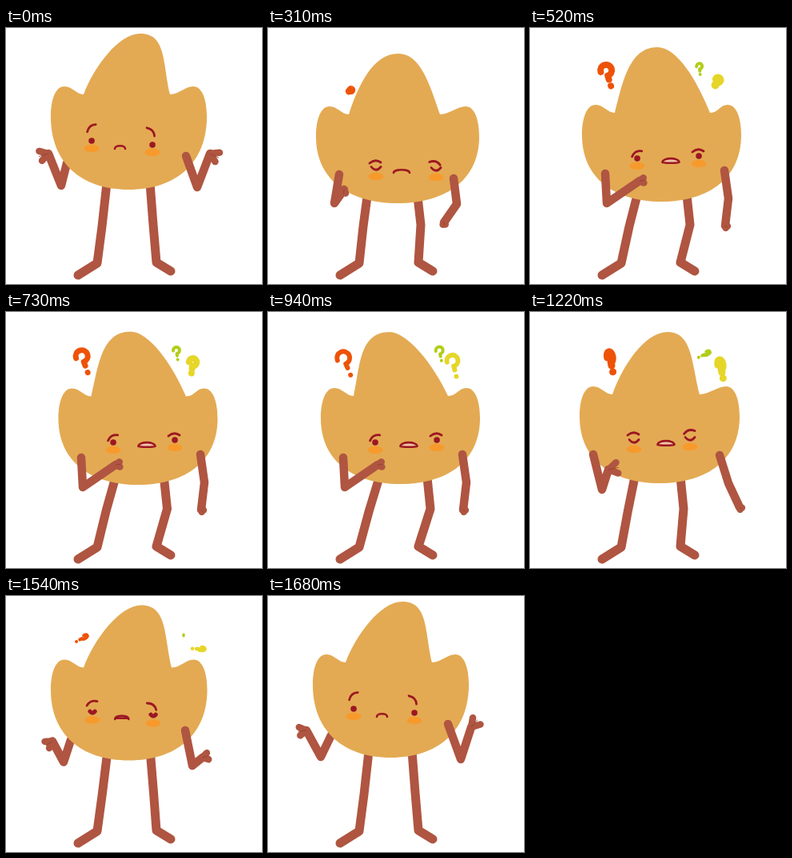
Recreate the animation shown at these times as an HTML page with a canvas. Size 320 px wide and 320 px high, loop 1750 ms.

```html
<!DOCTYPE html>
<html lang="en">
<head>
<meta charset="utf-8">
<title>Puzzled</title>
<style>
html, body { margin: 0; width: 100%; height: 100%; overflow: hidden; background: #fff; }
canvas { display: block; width: 100vw; height: 100vh; }
</style>
</head>
<body>
<canvas id="stage" width="320" height="320"></canvas>
<script>
const ctx = document.getElementById('stage').getContext('2d');
const LOOP = 1750, STEP = 70;
const SKIN = '#e3aa53', LIMB = '#af5541', CREASE = '#90402f';
const INK = '#9c1722', CHEEK = '#f79a2c', TEETH = '#efc7a6';
const MARK_COLORS = ['#ee5208', '#b2cd18', '#e6d628'];

const body = (x, y, left, right, ears, notch, bottom) => ({ x, y, left, right, ears, notch, bottom });
const arm = (shoulder, elbow, hand, angle, reach) => ({ shoulder, elbow, hand, angle, reach });
const face = (left, right, tilts, lift, open) => ({ eyes: [left, right], tilts, lift, open });
const mouth = (x, y, half, gape) => ({ x, y, half, gape });
const mark = (x, y, size, tilt, weight) => ({ x, y, size, tilt, weight });
const hidden = m => ({ ...m, weight: 0 });

const rise = {
  body: body(170, 16, 56, 252, 86, 209, 209),
  hips: [127, 181],
  left: arm([83, 186], [78, 214], [68, 195], 2.1, 9),
  right: arm([223, 176], [225, 220], [237, 240], .3, 4),
  face: face([109, 150], [185, 153], [0, .5], 8, 0),
  mouth: mouth(147, 155, 10.5, 5),
  marks: [mark(95, 53, 8, 1.05, 8), mark(222, 49, 1, 0, 6), mark(241, 66, 8, 1.6, 9)],
  squash: .5, armInFront: 0
};
const shrug = {
  body: body(168, 7, 56, 251, 73, 205, 202),
  hips: [126, 180],
  left: arm([76, 169], [69, 197], [53, 157], 2.85, 12),
  right: arm([225, 160], [239, 199], [255, 157], .45, 12),
  face: face([107, 141], [183, 146], [-.65, .9], 17, 1),
  mouth: mouth(142.5, 149, 6.5, 0),
  marks: rise.marks.map(hidden),
  squash: .5, armInFront: 0
};
const wave = {
  ...shrug,
  left: arm([79, 174], [66, 201], [48, 168], 3, 10),
  right: arm([225, 160], [241, 204], [254, 164], -.85, 12)
};
const ponder = {
  body: body(159, 24, 65, 264, 96, 225, 217),
  hips: [134, 196],
  left: arm([94, 182], [96, 219], [137, 191], -.1, 6),
  right: arm([243, 178], [248, 213], [244, 247], .8, 3),
  face: face([134, 163], [211, 160], [-.45, 0], 7, 1),
  mouth: mouth(176, 166, 10.5, 5),
  marks: [mark(97, 59, 14, -.3, 8), mark(212, 51, 7, -.1, 4), mark(234, 67, 5, .5, 10)],
  squash: 1, armInFront: 1
};
const wonder = {
  ...ponder,
  body: body(152, 25, 66, 265, 95, 225, 215),
  hips: [139, 199],
  marks: [mark(97, 64, 16, -.4, 6), mark(215, 52, 9, -.2, 4), mark(232, 67, 14, -.25, 6)]
};
const slump = {
  body: body(163, 32, 60, 264, 98, 215, 219),
  hips: [124, 187],
  left: arm([89, 183], [83, 219], [95, 202], 1.7, 5),
  right: arm([232, 188], [236, 220], [220, 243], 1.5, 3),
  face: face([135, 176], [210, 177], [0, .35], 9, 0),
  mouth: mouth(167, 179, 10, 0),
  marks: [mark(103, 78, 2, 1, 9), ...ponder.marks.slice(1).map(hidden)],
  squash: 1, armInFront: 1
};
const sigh = {
  body: body(172, 25, 62, 262, 93, 212, 214),
  hips: [131, 188],
  left: arm([79, 178], [90, 222], [98, 197], -.2, 13),
  right: arm([237, 179], [248, 214], [262, 244], .8, 3),
  face: face([130, 162], [200, 159], [0, -.2], 10, 0),
  mouth: mouth(170, 164, 10.5, 5),
  marks: [mark(101, 62, 13, -.2, 9), mark(218, 53, 8, 1.1, 4), mark(239, 71, 12, -.2, 9)],
  squash: .5, armInFront: 1
};
const KEYS = [[0, shrug], [310, slump], [520, ponder], [940, wonder],
  [1220, sigh], [1400, rise], [1680, wave]];

function mix(a, b, k) {
  if (typeof a === 'number') return a + (b - a) * k;
  if (Array.isArray(a)) return a.map((v, i) => mix(v, b[i], k));
  return Object.fromEntries(Object.keys(a).map(key => [key, mix(a[key], b[key], k)]));
}

function stepTime(t) {
  if (t < 310) return 0;
  const start = t < 1400 ? 310 : 1400;
  const stepped = start + Math.floor((t - start) / STEP) * STEP;
  return t < 1400 ? Math.min(stepped, 1220) : stepped;
}

function poseAt(t) {
  const i = KEYS.findLastIndex(key => key[0] <= t);
  const [start, pose] = KEYS[i];
  if (i === KEYS.length - 1) return pose;
  const [end, next] = KEYS[i + 1];
  const k = (t - start) / (end - start);
  return mix(pose, next, k * k * (3 - 2 * k));
}

function stroke(color, width, trace) {
  ctx.strokeStyle = color;
  ctx.lineWidth = width;
  ctx.beginPath();
  trace();
  ctx.stroke();
}

function line(points, color, width) {
  stroke(color, width, () => points.forEach(p => ctx.lineTo(...p)));
}

function oval(x, y, rx, ry, color) {
  ctx.fillStyle = color;
  ctx.beginPath();
  ctx.ellipse(x, y, rx, ry, 0, 0, Math.PI * 2);
  ctx.fill();
}

// A leaf of three lobes; the middle one fills out towards the side it leans to.
function drawBody({ x, y, left, right, ears, notch, bottom }) {
  const middle = (left + right) / 2, lean = .4 * (x - middle);
  const dip = ears + 10, side = ears + 38, low = side + .62 * (bottom - side);
  const start = left + 41, earLeft = left + 17, earRight = right - 17;
  const reach = .62 * (right - middle), rise = dip - y;
  ctx.fillStyle = SKIN;
  ctx.beginPath();
  ctx.moveTo(start, dip);
  ctx.bezierCurveTo(start + .18 * (x - start), dip - .45 * rise, x - 33 + lean, y, x, y);
  ctx.bezierCurveTo(x + 27 + lean, y, notch - .25 * (notch - x), dip - .5 * rise, notch, dip);
  ctx.bezierCurveTo(notch + 11, dip, earRight - 10, ears, earRight, ears);
  ctx.bezierCurveTo(earRight + 11, ears, right, side - 22, right, side);
  ctx.bezierCurveTo(right, low, middle + reach, bottom, middle, bottom);
  ctx.bezierCurveTo(middle - reach, bottom, left, low, left, side);
  ctx.bezierCurveTo(left, side - 22, earLeft - 11, ears, earLeft, ears);
  ctx.bezierCurveTo(earLeft + 10, ears, start - 9, dip, start, dip);
  ctx.fill();
}

// The feet stay planted while the hips sway.
function drawLegs([left, right], bottom) {
  const hip = bottom - 8;
  line([[left, hip], [(left + 114) / 2, 248], [114, 294], [90, 309]], LIMB, 11);
  line([[right, hip], [right + 4, 246], [188, 293], [206, 304]], LIMB, 11);
}

function drawArm({ shoulder, elbow, hand, angle, reach }) {
  const tip = turn => [hand[0] + reach * Math.cos(angle + turn), hand[1] + reach * Math.sin(angle + turn)];
  line([shoulder, elbow, hand], LIMB, 10.5);
  line([tip(-.55), hand, tip(.55)], LIMB, 8.5);
  line([hand, tip(0)], CREASE, .8);
}

// An open eye is the closed arc gathered into a dot.
function drawFace({ eyes, tilts, lift, open }) {
  const half = 6 * (1 - open), sag = 2.5 * (1 - open);
  eyes.forEach(([x, y], i) => {
    oval(x, y + 9.5, 9.5, 4.7, CHEEK);
    stroke(INK, 2.8 + 4.7 * open, () => {
      ctx.moveTo(x - half, y - sag);
      ctx.quadraticCurveTo(x, y + 2 * sag, x + half + .1, y - sag);
    });
    ctx.save();
    ctx.translate(x - 1, y - lift);
    ctx.rotate(tilts[i]);
    stroke(INK, 2.8, () => {
      ctx.moveTo(-7, 2);
      ctx.quadraticCurveTo(0, -4, 7, 1);
    });
    ctx.restore();
  });
}

function drawMouth({ x, y, half, gape }) {
  const base = y + 2, top = base - 5 - gape * .3, under = base - 5 + gape * 1.2;
  stroke(INK, 2.6, () => {
    ctx.moveTo(x - half, base);
    ctx.bezierCurveTo(x - half, top, x + half, top, x + half, base);
    ctx.bezierCurveTo(x + half, under, x - half, under, x - half, base);
    ctx.fillStyle = TEETH;
    ctx.fill();
  });
}

function drawMark({ x, y, size, tilt, weight }, color, squash) {
  if (weight < .1) return;
  ctx.save();
  ctx.translate(x, y);
  ctx.rotate(tilt);
  stroke(color, weight, () => {
    ctx.ellipse(0, -.45 * size, .5 * size * squash, .5 * size, 0, Math.PI, Math.PI * 2.5);
    ctx.lineTo(0, .4 * size);
  });
  oval(0, size, weight / 2, weight / 2, color);
  ctx.restore();
}

function draw(pose) {
  ctx.fillStyle = '#fff';
  ctx.fillRect(0, 0, 320, 320);
  ctx.lineCap = ctx.lineJoin = 'round';
  drawLegs(pose.hips, pose.body.bottom);
  if (pose.armInFront < .5) drawArm(pose.left);
  drawBody(pose.body);
  drawFace(pose.face);
  drawMouth(pose.mouth);
  if (pose.armInFront >= .5) drawArm(pose.left);
  drawArm(pose.right);
  pose.marks.forEach((m, i) => drawMark(m, MARK_COLORS[i], pose.squash));
}

const origin = performance.now();
function tick() {
  draw(poseAt(stepTime((performance.now() - origin) % LOOP)));
  requestAnimationFrame(tick);
}
tick();
</script>
</body>
</html>
```
